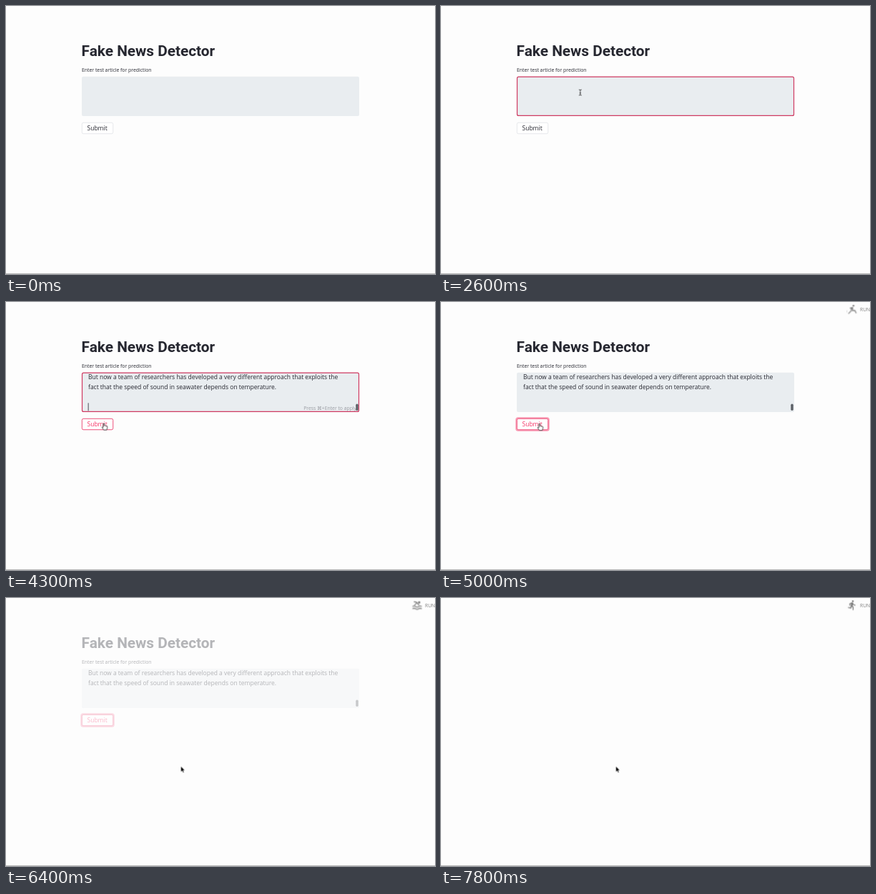
An HTML page that plays this animation: 600x375 px, repeating every 8000 ms.

```html
<!DOCTYPE html>
<html lang="en">
<head>
<meta charset="utf-8">
<title>Fake News Detector</title>
<style>
  html, body { margin: 0; width: 100%; height: 100%; overflow: hidden; background: #fdfdfd; }
  svg { display: block; }
  #stage { width: 100vw; height: 100vh; }
  text { font-family: "Open Sans", "DejaVu Sans", sans-serif; font-size: 8.5px; fill: #262730; }
  .title { font: 700 20.8px Roboto, sans-serif; }
  .label { font-size: 6.87px; }
  .hint { font-size: 6.8px; fill: #9a9da3; text-anchor: end; }
  .running { font-size: 6.7px; fill: #808080; }
  .figure { fill: none; stroke: #777; stroke-width: 2; }
  .solid { fill: #777; stroke: none; }
  .pink { stroke: #f63366; fill: none; }

  /* One shared 8 s clock: 1.25 % = 100 ms */
  .page, .focus, .caret, .article, .hint, .hover, .glow, .submit,
  .status, .strip, .pointer, .arrow, .beam, .hand { animation: 8s step-end infinite; }

  .page { animation-name: page; }
  .focus { animation-name: focus; }
  .caret { animation-name: caret; }
  .article { animation-name: article; }
  .hint { animation-name: hint; }
  .hover { animation-name: hover; }
  .submit { animation-name: submit; }
  .glow { animation-name: glow; }
  .status { animation-name: status; }
  .strip { animation-name: strip; animation-timing-function: steps(40); }
  .pointer { animation-name: pointer; }
  .arrow { animation-name: arrow; }
  .beam { animation-name: beam; }
  .hand { animation-name: hand; }

  @keyframes page {
    0% { opacity: 1; }
    63.1% { opacity: 1; animation-timing-function: ease-in; }
    77.5% { opacity: .34; }
    81.25%, 100% { opacity: 0; }
  }
  @keyframes focus {
    0% { opacity: 0; }
    25% { opacity: 0; animation-timing-function: linear; }
    28.75% { opacity: 1; }
    56.25%, 100% { opacity: 0; }
  }
  @keyframes caret {
    0% { opacity: 0; transform: none; }
    26.25% { opacity: 1; transform: none; }
    32.5% { opacity: 0; transform: none; }
    40% { opacity: 1; transform: translateY(35px); }
    46.25% { opacity: 0; transform: translateY(35px); }
    52.5% { opacity: 1; transform: translateY(35px); }
    56.25%, 100% { opacity: 0; transform: translateY(35px); }
  }
  @keyframes article { 0% { opacity: 0; } 36.25%, 100% { opacity: 1; } }
  @keyframes hint { 0% { opacity: 0; } 37.5% { opacity: 1; } 56.25%, 100% { opacity: 0; } }
  @keyframes hover { 0% { opacity: 0; } 51.25%, 100% { opacity: 1; } }
  @keyframes submit { 0% { fill: #262730; } 51.25%, 100% { fill: #f63366; } }
  @keyframes glow { 0% { opacity: 0; } 56.25%, 100% { opacity: .5; } }
  @keyframes status {
    0% { opacity: 0; }
    56.25% { opacity: 0; animation-timing-function: linear; }
    60%, 100% { opacity: 1; }
  }
  @keyframes strip { to { transform: translateX(-960px); } }
  @keyframes pointer {
    0% { transform: translate(186px, 157px); }
    16.25% { transform: translate(195px, 147px); }
    17.5% { transform: translate(202px, 136px); }
    18.75% { transform: translate(205px, 130px); }
    25% { transform: translate(194.7px, 121px); }
    43.75% { transform: translate(193.6px, 121px); }
    45% { transform: translate(195px, 118px); }
    46.25% { transform: translate(190px, 124px); }
    47.5% { transform: translate(180px, 135px); }
    48.75% { transform: translate(168px, 148px); }
    50% { transform: translate(155px, 159px); }
    51.25% { transform: translate(146px, 166px); }
    52.5% { transform: translate(140px, 169px); }
    53.75% { transform: translate(136.8px, 169.6px); }
    62% { transform: translate(136.8px, 169.6px); animation-timing-function: ease-in-out; }
    70%, 100% { transform: translate(244.6px, 235.6px); }
  }
  @keyframes arrow {
    0% { opacity: 0; }
    15% { opacity: 1; }
    16.25% { opacity: 0; }
    50% { opacity: 1; }
    51.25% { opacity: 0; }
    63.75%, 100% { opacity: 1; }
  }
  @keyframes beam { 0% { opacity: 0; } 16.25% { opacity: 1; } 50%, 100% { opacity: 0; } }
  @keyframes hand { 0% { opacity: 0; } 51.25% { opacity: 1; } 63.75%, 100% { opacity: 0; } }
</style>
</head>
<body>
<svg id="stage" viewBox="0 0 600 375">
  <defs>
    <!-- Six activities side by side, 24 units each -->
    <pattern id="activities" width="144" height="24" patternUnits="userSpaceOnUse">
      <g class="figure">
        <g>
          <circle cx="5" cy="17" r="4"/><circle cx="19" cy="17" r="4"/>
          <circle class="solid" cx="15.5" cy="3.5" r="2"/>
          <path d="M12 20V14.5L8.5 11.5L12.5 7.5L15 10H19"/>
        </g>
        <g transform="translate(24)">
          <circle class="solid" cx="15" cy="4.5" r="2"/>
          <path d="M4 22L11 14.5M7 10L13 8.5V15H18L21 21M13 9L9 13.5"/>
        </g>
        <g transform="translate(48)">
          <circle class="solid" cx="16.5" cy="6" r="2.5"/>
          <path d="M5 4.5L10.5 5.5L16 12M11 7L6 12.5"/>
          <path d="M2 15Q5.3 12.5 8.7 15T15.3 15T22 15M2 20Q5.3 17.5 8.7 20T15.3 20T22 20"/>
        </g>
        <path class="solid" transform="translate(72)" d="M13.5 5.5a2 2 0 1 0 0-4a2 2 0 0 0 0 4zM9.9 19.4l1-4.4 2.1 2v6h2v-7.5l-2.1-2 .6-3c1.3 1.5 3.3 2.5 5.5 2.5v-2c-1.9 0-3.5-1-4.3-2.4l-1-1.6c-.7-1-1.6-1.2-2.5-.9L6 8.3V13h2V9.6l1.8-.7L8.2 17l-4.9-1-.4 2z"/>
        <g class="solid" transform="translate(96)">
          <circle cx="12" cy="4" r="2"/>
          <path d="M21 9h-6v13h-2v-6h-2v6H9V9H3V7h18z"/>
        </g>
        <g transform="translate(120)">
          <circle class="solid" cx="13.5" cy="3.5" r="2"/>
          <path d="M7 13V9.5L11.5 7.5L14 11L18.5 12.5M11 8L9.5 15L6.5 22.5M10 14L13.5 17V22.5"/>
        </g>
      </g>
    </pattern>
  </defs>

  <rect width="600" height="375" fill="#fdfdfd"/>
  <rect y="374" width="600" height="1" fill="#b8b8b8"/>

  <g class="page">
    <text class="title" x="105.6" y="70.3">Fake News Detector</text>
    <text class="label" x="106" y="92.2">Enter test article for prediction</text>
    <rect x="106" y="98.7" width="388" height="55.2" rx="2" fill="#e9edf0"/>
    <rect class="focus" x="106.5" y="99.2" width="387" height="54.2" rx="2" fill="none" stroke="#d03a62" stroke-width="1.2"/>
    <g class="article">
      <text x="115" y="108.3">But now a team of researchers has developed a very different approach that exploits the</text>
      <text x="115" y="122.2">fact that the speed of sound in seawater depends on temperature.</text>
      <rect x="489.3" y="142.6" width="3.4" height="9.4" rx="1.7" fill="#5c6066"/>
    </g>
    <text class="hint" x="490" y="150.6">Press ⌘+Enter to apply</text>
    <rect class="caret" x="114.7" y="106.3" width=".8" height="11" fill="#262730"/>

    <rect class="pink glow" x="105.2" y="162.2" width="45.6" height="17.6" rx="2.6" stroke-width="1.8"/>
    <rect x="106.3" y="163.3" width="43.4" height="15.4" rx="2" fill="#fff" stroke="#dcdee3" stroke-width=".7"/>
    <rect class="pink hover" x="106.3" y="163.3" width="43.4" height="15.4" rx="2" stroke-width=".8"/>
    <text class="submit" x="113.5" y="174">Submit</text>
  </g>

  <g class="status">
    <svg x="567.3" y="2.3" width="15.4" height="15.4" viewBox="0 0 24 24">
      <rect class="strip" width="984" height="24" fill="url(#activities)"/>
    </svg>
    <text class="running" x="586" y="12.8">RUNNING...</text>
  </g>

  <g class="pointer">
    <path class="arrow" d="M0 0V7.6L1.8 6L3 8.8L4.3 8.3L3.1 5.6H5.4Z" fill="#000" stroke="#fff" stroke-width=".4"/>
    <path class="beam" d="M-1.9-4Q0-4 0-3Q0-4 1.9-4M0-3V3M-1.9 4Q0 4 0 3Q0 4 1.9 4M-1 .9H1" fill="none" stroke="#222" stroke-width=".8"/>
    <path class="hand" d="M-.8 .6Q0-.4 .8 .6V3.6Q1.6 2.8 2.3 3.8Q3 3.1 3.7 4.1Q4.8 3.7 4.9 4.8V6.5L4 9.4H-.2L-2.6 5.9Q-2.7 4.6-.8 5.6Z" fill="#fff" stroke="#222" stroke-width=".8"/>
  </g>
</svg>
</body>
</html>
```
